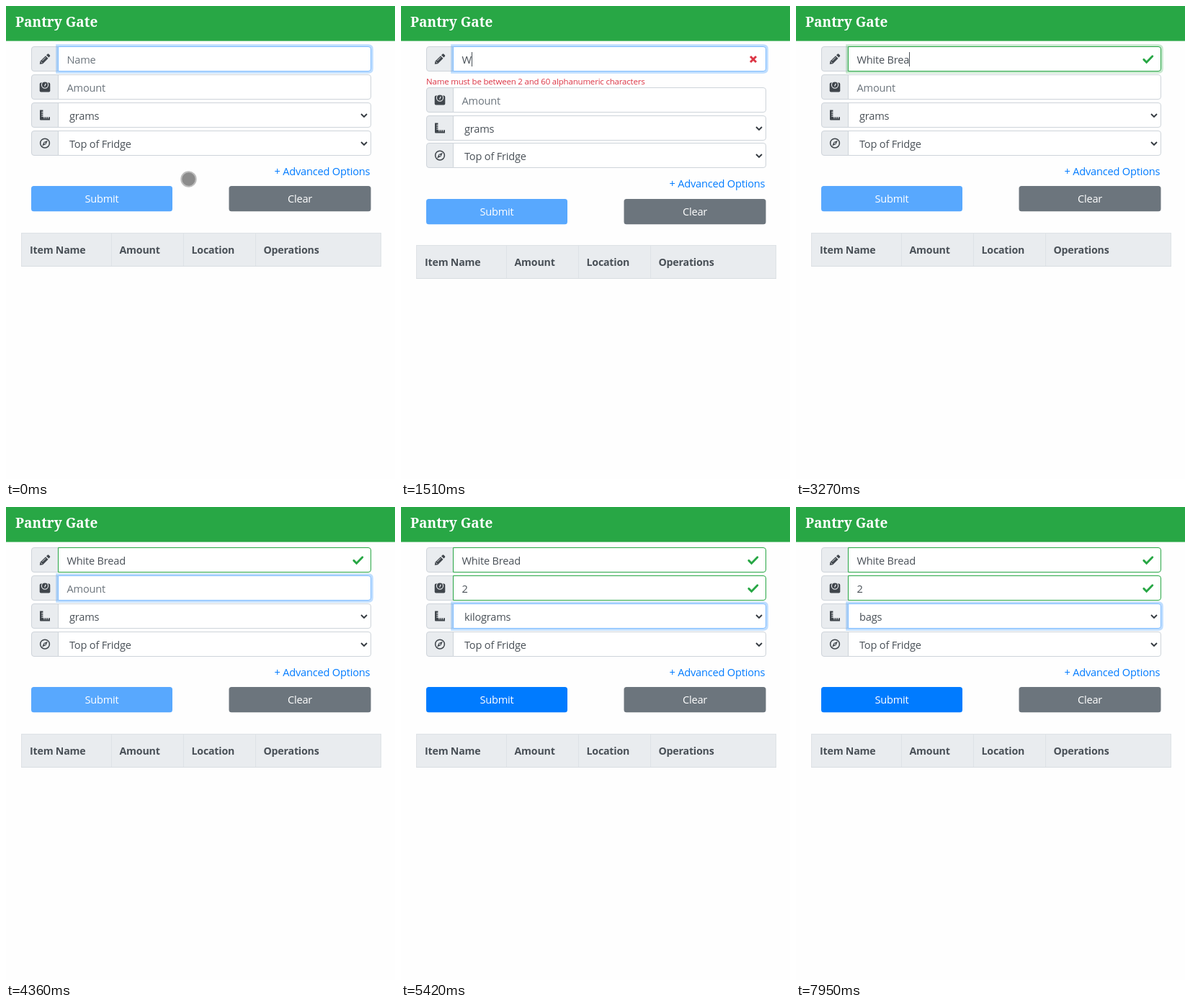
These frames come from a looping animation (540 by 657 pixels, 8000 ms). An HTML page:

```html
<!DOCTYPE html>
<html lang="en">
<head>
<meta charset="utf-8">
<title>Pantry form</title>
<style>
  html, body { margin: 0; width: 100%; height: 100%; overflow: hidden; background: #fefefe; }
  svg { display: block; }
  text { font: 14.6px "Open Sans", "Noto Sans", sans-serif; letter-spacing: -.014em; fill: #495057; white-space: pre; }
  .brand { font: bold 19px "Noto Serif", serif; letter-spacing: 0; fill: #fff; }
  .head { font-size: 14.2px; font-weight: bold; }
  .error { font-size: 11.45px; fill: #dc3545; }
  .link { fill: #007bff; text-anchor: end; }
  .button { fill: #fff; text-anchor: middle; }
</style>
</head>
<body>
<script>
const LOOP = 8000, FADE = 150;
const ERROR_ON = 1510, ERROR_OFF = 1830, TO_AMOUNT = 3920, AMOUNT_TYPED = 4560, TO_UNIT = 4950;

const typing = [
  [0, ''], [1510, 'W'], [1830, 'Wh'], [1930, 'Whi'], [2040, 'Whit'], [2130, 'White'], [2350, 'White '],
  [2820, 'White B'], [2940, 'White Br'], [3100, 'White Bre'], [3270, 'White Brea'], [3510, 'White Bread']
];
const units = [
  [0, 'grams'], [5420, 'kilograms'], [5920, 'ounces'], [5980, 'pounds'], [6040, 'cups'],
  [6340, 'teaspoons'], [6530, 'tablespoons'], [6720, 'milliliters'], [6910, 'liters'],
  [7210, 'cans'], [7500, 'boxes'], [7720, 'jars'], [7950, 'bags']
];
const nameCaret = [[0, 0], [110, 1], [580, 0], [1080, 1], [TO_AMOUNT, 0]];
const amountCaret = [[0, 0], [TO_AMOUNT, 1], [4360, 0], [AMOUNT_TYPED, 1], [TO_UNIT, 0]];

// Each look: border rgb, then glow rgba
const GREEN = [40, 167, 69], RED = [220, 53, 69], BLUE = [0, 123, 255];
const idle = [206, 212, 218, ...BLUE, 0];
const focus = [128, 189, 255, ...BLUE, .25];
const invalid = [...RED, ...RED, .25];
const valid = [...GREEN, ...GREEN, .25];
const validIdle = [...GREEN, ...GREEN, 0];

const NS = 'http://www.w3.org/2000/svg';
function add(parent, tag, attrs = {}, content = '') {
  const el = document.createElementNS(NS, tag);
  for (const key in attrs) el.setAttribute(key, attrs[key]);
  el.textContent = content;
  return parent.appendChild(el);
}
const label = (parent, x, y, content, cls = '') => add(parent, 'text', { x, y, class: cls }, content);
const show = (el, on) => el.setAttribute('visibility', on ? 'visible' : 'hidden');

const svg = add(document.body, 'svg', { width: 540, height: 657, viewBox: '0 0 540 657' });
const movers = [];
function group(shift) {
  const g = add(svg, 'g');
  movers.push([g, shift]);
  return g;
}

add(svg, 'rect', { width: 540, height: 48.6, fill: '#28a745' });
label(svg, 13, 29, 'Pantry Gate', 'brand');

const DARK = '#40464c', PALE = '#e9ecef';
const icons = {
  pencil(g) {
    add(g, 'path', { fill: DARK, d: 'M1-4.4L4.5-.9L-3 6.7L-7.2 7.2L-6.6 3.2ZM2-5.4L3.6-6.9Q4.5-7.6 5.4-6.9L6.9-5.4Q7.6-4.5 6.9-3.6L5.4-2Z' });
    add(g, 'path', { stroke: PALE, 'stroke-width': .9, d: 'M-3.6 2.4L1.2-2.4M-5.6 3.6L-3.6 5.6' });
  },
  scale(g) {
    add(g, 'rect', { x: -7.3, y: -6, width: 14.6, height: 13, rx: 1.8, fill: DARK });
    add(g, 'circle', { cy: -3, r: 4.6, fill: DARK, stroke: PALE, 'stroke-width': 1.1 });
    add(g, 'path', { stroke: PALE, 'stroke-width': 1.3, d: 'M-.4-1.2L1.2-4.8' });
  },
  ruler(g) {
    add(g, 'path', { fill: DARK, d: 'M-7-7H-2.6V2.6H7V7H-6Q-7 7-7 6Z' });
    add(g, 'path', { stroke: PALE, d: 'M-4.8-4.2H-2M-4.8-1.4H-2M-4.8 1.4H-2M-1 2V4.8M1.8 2V4.8M4.6 2V4.8' });
  },
  compass(g) {
    add(g, 'circle', { r: 6.4, fill: 'none', stroke: DARK, 'stroke-width': 1.5 });
    add(g, 'path', { fill: DARK, d: 'M3.9-3.9L1.5 1.5L-3.9 3.9L-1.5-1.5Z' });
    add(g, 'circle', { r: 1, fill: PALE });
  }
};

function field(y, icon, shift) {
  const g = group(shift), bottom = y + 35;
  add(g, 'path', {
    fill: PALE, stroke: '#ced4da',
    d: `M73 ${y + .5}H39Q35.5 ${y + .5} 35.5 ${y + 4}V${bottom - 4}Q35.5 ${bottom - .5} 39 ${bottom - .5}H73Z`
  });
  icons[icon](add(g, 'g', { transform: `translate(54 ${y + 17.6})` }));
  const d = `M72.5 ${y + .5}H503Q506.5 ${y + .5} 506.5 ${y + 4}V${bottom - 4}Q506.5 ${bottom - .5} 503 ${bottom - .5}H72.5Z`;
  const glow = add(g, 'path', { d, fill: 'none', 'stroke-width': 6.6 });
  const box = add(g, 'path', { d, fill: '#fff' });
  return { g, y, glow, box };
}

function textField(y, icon, shift) {
  const f = field(y, icon, shift);
  f.text = label(f.g, 84.5, y + 24, '');
  f.caret = add(f.g, 'rect', { y: y + 8, width: 1, height: 20, fill: '#495057' });
  f.check = add(f.g, 'path', {
    transform: `translate(488.8 ${y + 18})`, d: 'M-6 .4L-2.2 4.2L6-4.3',
    fill: 'none', stroke: '#28a745', 'stroke-width': 2.9, 'stroke-linecap': 'round'
  });
  return f;
}

function selectField(y, icon, shift, value) {
  const f = field(y, icon, shift);
  f.text = label(f.g, 88, y + 24, value);
  add(f.g, 'path', { d: `M493 ${y + 16}l4 4l4-4`, fill: 'none', stroke: '#343a40', 'stroke-width': 1.9 });
  return f;
}

const name = textField(56, 'pencil', 0);
const amount = textField(95, 'scale', 18);
const unit = selectField(134, 'ruler', 18, 'grams');
const place = selectField(173, 'compass', 17, 'Top of Fridge');
const cross = add(name.g, 'path', { transform: 'translate(489 74)', d: 'M-4-4L4 4M4-4L-4 4', stroke: '#dc3545', 'stroke-width': 2.9 });
const error = label(svg, 35, 109, 'Name must be between 2 and 60 alphanumeric characters', 'error');

label(group(17), 505.3, 235, '+ Advanced Options', 'link');

const buttons = group(18);
function button(x, width, fill, caption) {
  const rect = add(buttons, 'rect', { x, y: 250, width, height: 35.3, rx: 3.5, fill });
  label(buttons, x + width / 2, 273, caption, 'button');
  return rect;
}
const submit = button(35, 196, '#007bff', 'Submit');
button(309.5, 197, '#6c757d', 'Clear');

const table = group(17);
add(table, 'rect', { x: 21.5, y: 315.5, width: 499, height: 46, fill: PALE, stroke: '#dee2e6' });
add(table, 'path', { d: 'M146.5 316V361M246.5 316V361M346.5 316V361', stroke: '#dee2e6' });
add(table, 'path', { d: 'M21 361.5H521', stroke: '#d9dde1' });
[[33, 'Item Name'], [157.5, 'Amount'], [257.5, 'Location'], [357.5, 'Operations']]
  .forEach(([x, title]) => label(table, x, 344, title, 'head'));

const pointer = add(svg, 'circle', { cx: 253.5, cy: 240.5, r: 10.2, fill: '#8c8c8c', stroke: '#bdbdbd', 'stroke-width': 2 });

const at = (steps, t) => steps.filter(step => step[0] <= t).pop()[1];

// CSS "ease" curve, solved by bisection
function ease(x) {
  let lo = 0, hi = 1, u = .5;
  for (let i = 0; i < 16; i++) {
    u = (lo + hi) / 2;
    const bx = 3 * u * (1 - u) ** 2 * .25 + 3 * u * u * (1 - u) * .25 + u ** 3;
    if (bx < x) lo = u; else hi = u;
  }
  return 3 * u * (1 - u) ** 2 * .1 + 3 * u * u * (1 - u) + u ** 3;
}

function paint(f, looks, t) {
  let i = looks.length - 1;
  while (looks[i][0] > t) i--;
  const to = looks[i][1], from = i ? looks[i - 1][1] : to;
  const p = ease(Math.min(1, (t - looks[i][0]) / FADE));
  const c = to.map((v, k) => from[k] + (v - from[k]) * p);
  f.box.setAttribute('stroke', `rgb(${c.slice(0, 3)})`);
  f.glow.setAttribute('stroke', `rgb(${c.slice(3, 6)})`);
  f.glow.setAttribute('stroke-opacity', c[6]);
}

function write(f, value, placeholder, caretOn) {
  f.text.textContent = value;
  const width = value ? f.text.getComputedTextLength() : 0;
  f.caret.setAttribute('x', Math.round(84.4 + width));
  show(f.caret, caretOn);
  f.text.textContent = value || placeholder;
  f.text.style.fill = value ? '#495057' : '#6c757d';
}

const nameLooks = [[0, focus], [ERROR_ON, invalid], [ERROR_OFF, valid], [TO_AMOUNT, validIdle]];
const amountLooks = [[0, idle], [TO_AMOUNT, focus], [AMOUNT_TYPED, valid], [TO_UNIT, validIdle]];
const unitLooks = [[0, idle], [TO_UNIT, focus]];

function render(t) {
  const bad = t >= ERROR_ON && t < ERROR_OFF, ready = t >= AMOUNT_TYPED;
  movers.forEach(([g, shift]) => g.setAttribute('transform', `translate(0 ${bad ? shift : 0})`));
  paint(name, nameLooks, t);
  paint(amount, amountLooks, t);
  paint(unit, unitLooks, t);
  paint(place, [[0, idle]], t);
  write(name, at(typing, t), 'Name', at(nameCaret, t));
  write(amount, ready ? '2' : '', 'Amount', at(amountCaret, t));
  unit.text.textContent = at(units, t);
  show(error, bad);
  show(cross, bad);
  show(name.check, t >= ERROR_OFF);
  show(amount.check, ready);
  show(pointer, t < ERROR_ON);
  submit.setAttribute('opacity', ready ? 1 : .65);
}

const start = performance.now();
function tick() {
  render((performance.now() - start) % LOOP);
  requestAnimationFrame(tick);
}
tick();
</script>
</body>
</html>
```
